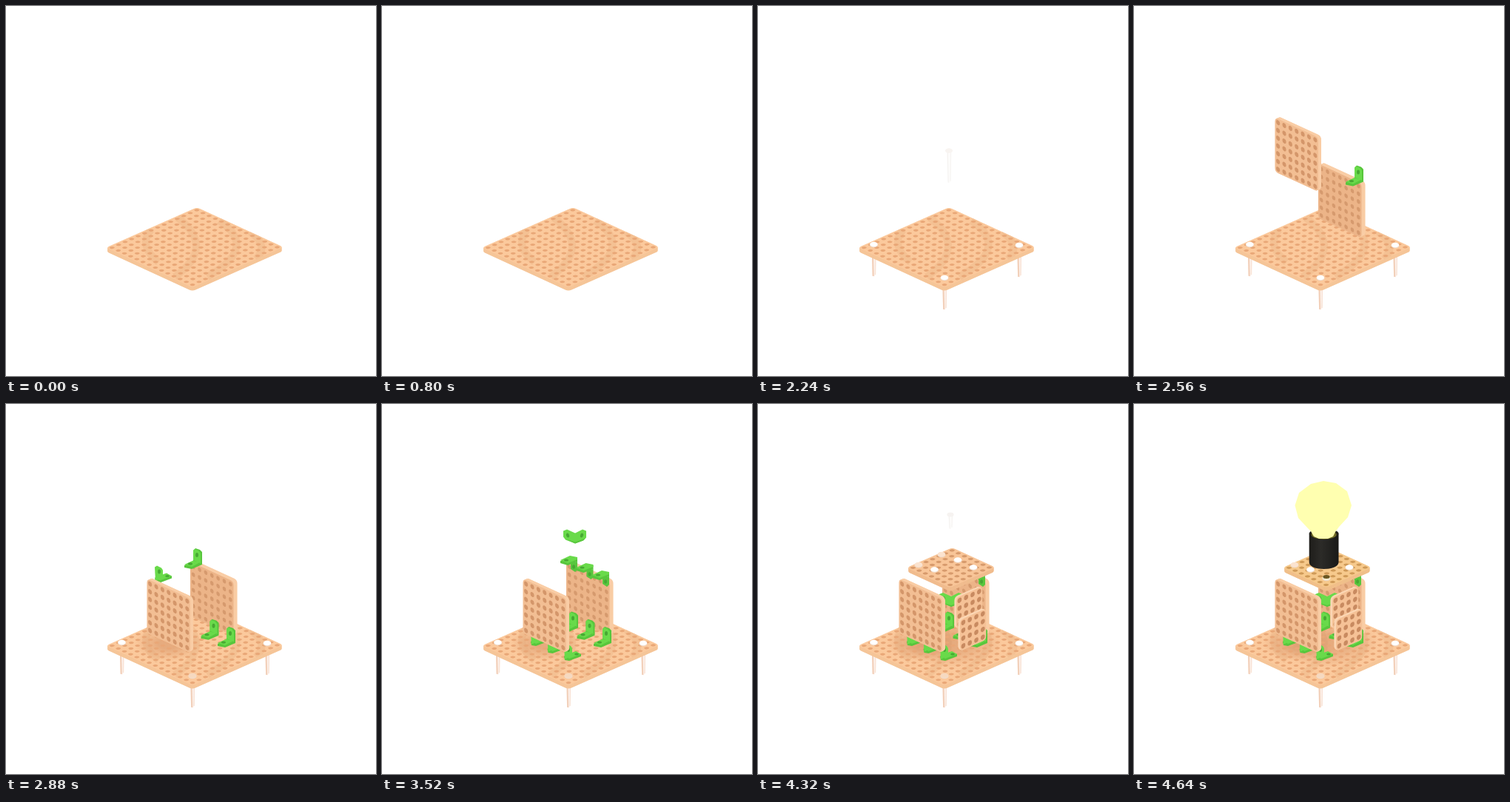
Animation, 500 px wide and 500 px high, one loop 6.4 s. Source, as an HTML page with a canvas:

```html
<!DOCTYPE html>
<html lang="en">
<head>
<meta charset="utf-8">
<title>Lamp assembly</title>
<style>
  html, body { margin: 0; width: 100%; height: 100%; overflow: hidden; background: #fff; }
  canvas { display: block; width: 500px; height: 500px; }
</style>
</head>
<body>
<canvas id="stage"></canvas>
<script>
const LOOP = 6400, HOLD = 800, STEP = 160, LAST = 25;
const canvas = document.getElementById('stage');
const ratio = window.devicePixelRatio || 1;
canvas.width = canvas.height = 500 * ratio;
const ctx = canvas.getContext('2d');

// Screen vectors for one hole pitch along each axis
const U = [8.36, 3.85], V = [-8.8, 3.9], W = [0, 10.5], BACK = [8.8, -3.9];
const GREEN = '#69da4a', GREEN_SIDE = '#58c63d', GREEN_HOLE = '#47a833';

const WOOD = { face: '#fbc99c', edge: '#f5c598', hole: '#e9a777', r: 0.27 };
const PANEL = { face: '#f2be93', edge: '#f9cda6', hole: '#d4966a', r: 0.31 };
const REAR = { face: '#ecb488', edge: '#f9cda6', hole: '#d69a6e', r: 0.28 };
const SMALL = { face: '#f5c196', edge: '#fbd6b4', hole: '#c88a60', r: 0.32 };
const TOP = { face: '#f8c598', edge: '#f0bc8e', hole: '#d79a6c', r: 0.28 };
const LIT = { face: '#f6c98c', edge: '#f0bf8a', hole: '#cf9a58', r: 0.28 };

let step = 0;

// A part enters two steps before landing and slows down as it drops
function drop(land, draw) {
  const left = Math.max(0, land - step);
  if (left > 2) return;
  ctx.save();
  ctx.translate(0, -85.5 * left * left);
  draw(left === 0);
  ctx.restore();
}

function poly(color, pts) {
  ctx.beginPath();
  for (let i = 0; i < pts.length; i += 2) ctx.lineTo(pts[i], pts[i + 1]);
  ctx.closePath();
  ctx.fillStyle = color;
  ctx.fill();
}

function oval(color, x, y, rx, ry, tilt = 0) {
  ctx.beginPath();
  ctx.ellipse(x, y, rx, ry, tilt, 0, 7);
  ctx.fillStyle = color;
  ctx.fill();
}

function line(color, width, x1, y1, x2, y2) {
  ctx.beginPath();
  ctx.moveTo(x1, y1);
  ctx.lineTo(x2, y2);
  ctx.strokeStyle = color;
  ctx.lineWidth = width;
  ctx.stroke();
}

// Perforated sheet: origin, two axes, hole counts and depth vector
function sheet(x, y, a, b, cols, rows, depth, c, decorate) {
  const slab = (k, color) => {
    ctx.save();
    ctx.transform(a[0], a[1], b[0], b[1], x + depth[0] * k, y + depth[1] * k);
    ctx.beginPath();
    ctx.roundRect(0, 0, cols, rows, 0.5);
    ctx.fillStyle = color;
    ctx.fill();
    ctx.restore();
  };
  for (let k = 10; k > 0; k--) slab(k / 10, c.edge);
  slab(0, c.face);
  if (decorate) {
    ctx.save();
    ctx.clip();
    decorate();
    ctx.restore();
  }
  ctx.save();
  ctx.transform(a[0], a[1], b[0], b[1], x, y);
  ctx.fillStyle = c.hole;
  ctx.beginPath();
  for (let i = 0.5; i < cols; i++) {
    for (let j = 0.5; j < rows; j++) {
      ctx.moveTo(i + c.r, j);
      ctx.arc(i, j, c.r, 0, 7);
    }
  }
  ctx.fill();
  ctx.restore();
}

function shadow(x, y, radius) {
  ctx.save();
  ctx.translate(x, y);
  ctx.scale(1, 0.5);
  const g = ctx.createRadialGradient(0, 0, radius * 0.3, 0, 0, radius);
  g.addColorStop(0, 'rgba(205,135,90,.45)');
  g.addColorStop(1, 'rgba(205,135,90,0)');
  ctx.fillStyle = g;
  ctx.fillRect(-radius, -radius, 2 * radius, 2 * radius);
  ctx.restore();
}

function ground() {
  const curves = [[232, 286, 284, 326, 228, 366], [288, 290, 342, 326, 272, 366],
                  [196, 302, 178, 324, 206, 346], [330, 305, 356, 324, 338, 342]];
  ctx.strokeStyle = 'rgba(224,168,120,.25)';
  ctx.lineWidth = 10;
  for (const [x1, y1, cx, cy, x2, y2] of curves) {
    ctx.beginPath();
    ctx.moveTo(x1, y1);
    ctx.quadraticCurveTo(cx, cy, x2, y2);
    ctx.stroke();
  }
  if (step >= 13) shadow(220, 324, 46);
  if (step >= 20) shadow(262, 322, 68);
}

function head(x, y, fill = '#fff') {
  oval('#efdccd', x, y + 0.7, 5.5, 3.6);
  oval(fill, x, y, 5.1, 3.3);
}

function shaft(x, y, len, landed) {
  poly(landed ? '#fdf3ed' : '#fdfcfb',
       [x - 3, y, x + 3, y, x + 2.6, y + len - 3, x, y + len, x - 2, y + len - 3]);
  line(landed ? '#f2d0ba' : '#f4f2f0', landed ? 2.2 : 1, x - 1.8, y, x - 0.8, y + len - 1);
  line(landed ? '#f8e2d5' : '#f7f5f3', 1.4, x + 2.6, y, x + 2, y + len - 3);
}

// x, y of the head and landing step
const LEGS = [[353, 323, 5], [252, 367, 7], [156.5, 322, 9], [258, 281, 11]];

function legs(landed) {
  for (const [x, y, land] of LEGS) {
    if ((step >= land) !== landed) continue;
    drop(land, () => {
      shaft(x, y, 44, landed);
      if (!landed) oval('#f8f4f1', x, y, 5, 3.2);
    });
  }
}

// Bracket with the foot towards the viewer's left
function bracketLeft(x, y) {
  poly(GREEN_SIDE, [x - 12, y + 9, x + 3, y + 3, x + 12, y + 4, x + 12, y + 8, x - 2, y + 14, x - 12, y + 12]);
  poly(GREEN, [x - 12, y + 8, x + 1, y + 2, x + 11, y + 4, x - 2, y + 11]);
  poly(GREEN_SIDE, [x, y - 11, x + 3, y - 14, x + 9, y - 12, x + 12, y - 9, x + 12, y + 5, x, y + 3]);
  poly(GREEN, [x, y - 11, x + 2, y - 13, x + 7, y - 11, x + 10, y - 7, x + 10, y + 6, x, y + 2]);
  oval(GREEN_HOLE, x + 5, y - 5, 2, 3);
  oval(GREEN_HOLE, x - 4, y + 7, 3, 1.7);
}

// Bracket with the foot towards the right
function bracketRight(x, y) {
  poly(GREEN_SIDE, [x - 12, y + 6, x + 2, y, x + 11, y + 3, x + 11, y + 6, x - 5, y + 12, x - 11, y + 11]);
  poly(GREEN, [x - 12, y + 5, x + 4, y - 1, x + 11, y + 3, x - 5, y + 9]);
  poly(GREEN, [x - 12, y - 9, x - 9, y - 11, x - 3, y - 8, x - 1, y - 5, x - 1, y + 5, x - 11, y + 10]);
  oval(GREEN_HOLE, x - 6, y - 3, 2, 3);
  oval(GREEN_HOLE, x + 5, y + 3, 2.8, 1.6);
}

// Bracket lying on the panel's upper edge with its tab down
function bracketTop(x, y) {
  poly(GREEN_SIDE, [x + 2, y + 3, x + 11, y + 1, x + 11, y + 12, x + 8, y + 15, x + 2, y + 11]);
  oval(GREEN_HOLE, x + 6, y + 8, 2, 2.8);
  poly(GREEN_SIDE, [x - 12, y, x + 11, y - 4, x + 11, y + 1, x - 2, y + 6, x - 12, y + 3]);
  poly(GREEN, [x - 12, y - 1, x + 1, y - 7, x + 11, y - 5, x + 11, y - 2, x - 2, y + 3]);
  oval(GREEN_HOLE, x - 4, y - 1, 3, 1.6);
}

function bracketCorner(x, y) {
  poly(GREEN, [x - 16, y - 8, x - 11, y - 10, x, y - 5, x + 10, y - 10, x + 15, y - 8,
               x + 15, y + 1, x + 11, y + 5, x, y + 9, x - 13, y + 4, x - 16, y]);
  poly(GREEN_SIDE, [x - 13, y + 3, x, y + 7, x + 14, y + 2, x + 11, y + 5, x, y + 9]);
  oval(GREEN_HOLE, x - 10, y - 2, 2, 3, -0.3);
  oval(GREEN_HOLE, x + 9, y - 2, 2, 3, 0.3);
}

function bulb() {
  const g = ctx.createLinearGradient(237, 0, 276, 0);
  g.addColorStop(0, '#1e1d1a');
  g.addColorStop(0.4, '#2c2b28');
  g.addColorStop(1, '#1a1a18');
  ctx.fillStyle = g;
  ctx.beginPath();
  ctx.moveTo(236.7, 175);
  ctx.lineTo(236.7, 214);
  ctx.bezierCurveTo(237, 226, 276, 226, 276.5, 214);
  ctx.lineTo(276.5, 175);
  ctx.fill();
  oval('#23211a', 256.6, 175, 19.9, 6.5);
  oval('#6f6a24', 256.6, 176.5, 17, 6.2);
  poly('#ffffb0', [239, 108, 256, 104, 273, 107, 288, 118, 294, 137, 289, 153, 277, 166, 272, 173,
                   269, 179, 262, 182, 250, 182, 243, 179, 239, 172, 235, 168, 222, 154, 217.5, 137, 223, 120]);
}

function topScrew(x, y, land, fill) {
  drop(land, landed => {
    if (landed) return head(x, y, fill);
    shaft(x, y, 20, false);
    oval('#f6f3f1', x, y, 4.6, 3);
  });
}

function scene() {
  ctx.setTransform(ratio, 0, 0, ratio, 0, 0);
  ctx.fillStyle = '#fff';
  ctx.fillRect(0, 0, 500, 500);

  legs(true);
  sheet(258, 272, U, V, 14, 14, [0, 5], WOOD, ground);
  for (const [x, y, land] of LEGS) {
    const dim = step >= 13 && y > 350;
    if (step >= land) head(x, y, dim ? '#f6d9c0' : '#fff');
  }
  legs(false);

  drop(12, () => sheet(249, 213, U, W, 7, 7, [5, -2.2], REAR));
  for (let i = 0; i < 3; i++) {
    drop(15 - i, () => bracketLeft(253 + 22.5 * i, 294.5 + 10.3 * i));
    drop(18 - i, () => bracketTop(253 + 21.5 * i, 212 + 10 * i));
  }
  for (let i = 0; i < 3; i++) {
    drop(15 + i, () => bracketRight(213 + 22.5 * i, 315 + 10 * i));
  }
  drop(19, () => bracketCorner(261, 265));
  drop(13, () => sheet(190.5, 236, U, W, 7, 7, [4, -1.8], PANEL));

  drop(20, () => sheet(268, 262, BACK, W, 4, 4, [-2.5, -1.2], SMALL));
  drop(20, () => sheet(273, 292, BACK, W, 4, 4, [-2.5, -1.2], SMALL));
  drop(21, () => sheet(262.5, 194, U, V, 7, 7, [0, 5], step === LAST ? LIT : TOP));

  topScrew(248, 203, 22, '#fbe3cf');
  topScrew(217, 217, 22, '#fbe3cf');
  topScrew(270, 210.5, 23);
  topScrew(291, 220.5, 23);
  topScrew(238.5, 223.5, 23);
  topScrew(260, 235, 24, '#f4ecd0');
  if (step === LAST) oval('#6b5722', 260, 233.5, 4.6, 2.5);
  drop(LAST, bulb);
}

const start = performance.now();
let shown = -1;

function run() {
  const t = (performance.now() - start) % LOOP;
  step = t < HOLD ? 0 : Math.min(LAST, 1 + Math.floor((t - HOLD) / STEP));
  if (step !== shown) {
    shown = step;
    scene();
  }
  requestAnimationFrame(run);
}
run();
</script>
</body>
</html>
```
